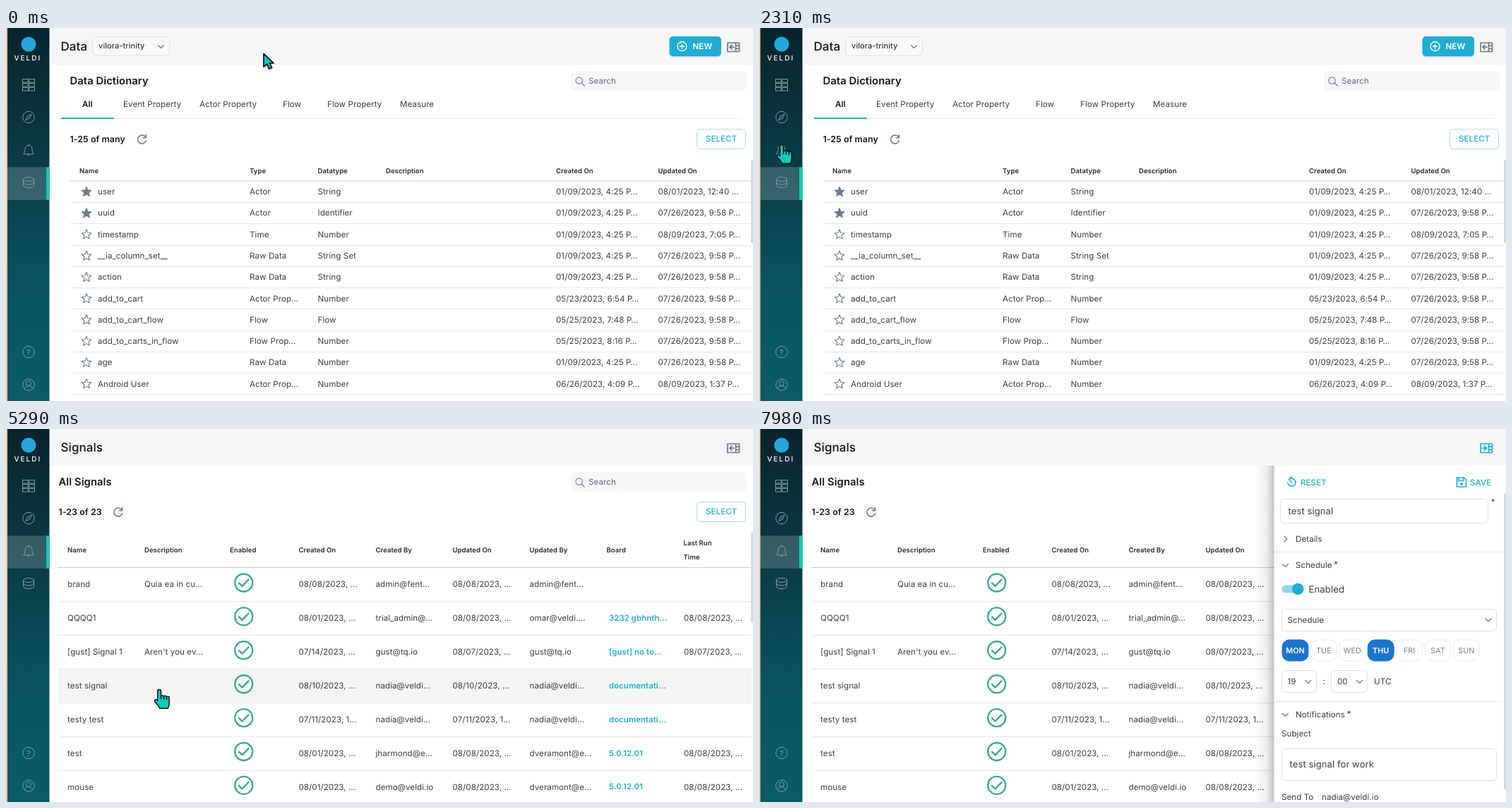
These frames come from a looping animation (1058 by 529 pixels, 8950 ms). An HTML page:

```html
<!DOCTYPE html>
<html lang="en">
<head>
<meta charset="utf-8">
<title>Signals demo</title>
<style>
html, body { margin: 0; width: 100%; height: 100%; overflow: hidden; background: #fff; }
svg { display: block; width: 100vw; height: 100vh; }
text { font-family: Inter, sans-serif; letter-spacing: .06px; white-space: pre; text-rendering: geometricPrecision; }
.line { stroke-linecap: round; stroke-linejoin: round; }
</style>
</head>
<body>
<svg id="stage" viewBox="0 0 1058 529">
  <defs>
    <linearGradient id="sea" x2="0" y2="1">
      <stop offset="0" stop-color="#06242d"/><stop offset=".2" stop-color="#08313b"/>
      <stop offset=".72" stop-color="#0a5563"/><stop offset="1" stop-color="#0a5a67"/>
    </linearGradient>
    <linearGradient id="shade">
      <stop offset="0" stop-opacity="0"/><stop offset=".6" stop-opacity=".07"/><stop offset="1" stop-opacity=".24"/>
    </linearGradient>
  </defs>
</svg>
<script>
const LOOP = 8950, CYAN = '#20aed2', GREY = '#6c7c8b', TEAL = '#10c8bd', INK = '#15181b', BODY = '#3a3f44';
const stage = document.getElementById('stage');

// Markup helpers
const text = (x, y, s, size = 11.6, weight = 400, fill = BODY, extra = '') =>
  `<text x="${x}" y="${y}" style="font-size:${size}px;font-weight:${weight};fill:${fill};${extra}">${s}</text>`;
const rect = (x, y, w, h, fill, r = 0, stroke = 'none') =>
  `<rect x="${x}" y="${y}" width="${w}" height="${h}" rx="${r}" fill="${fill}" stroke="${stroke}"/>`;
const path = (d, stroke, width = 1, fill = 'none') =>
  `<path class="line" d="${d}" stroke="${stroke}" stroke-width="${width}" fill="${fill}"/>`;
const ring = (x, y, r, stroke, width = 1, fill = 'none') =>
  `<circle cx="${x}" cy="${y}" r="${r}" fill="${fill}" stroke="${stroke}" stroke-width="${width}"/>`;
const hline = (x1, x2, y, fill = '#e3e5e7') => rect(x1, y, x2 - x1, 1, fill);
const group = (id, body) => `<g id="${id}">${body}</g>`;
const list = (n, f) => Array.from({ length: n }, (_, i) => f(i)).join('');
const chevron = (x, y, w = 4, c = '#6b747c') => path(`M${x - w} ${y - w / 2}l${w} ${w}l${w} ${-w}`, c, 1.1);
const refresh = (x, y) => path(`M${x + 5} ${y - 3.5}a6 6 0 1 0 .9 5M${x + 5.8} ${y - 6.5}v4.2h-4.2`, GREY, 1.6);

function star(x, y, full) {
  const pts = Array.from({ length: 10 }, (_, i) => {
    const r = i % 2 ? 3.2 : 7.3, a = (i / 5 - .5) * Math.PI;
    return `${(x + r * Math.cos(a)).toFixed(1)} ${(y + r * Math.sin(a)).toFixed(1)}`;
  });
  return path(`M${pts.join('L')}Z`, GREY, 1.1, full ? GREY : 'none');
}

// Box with a column of cells at its right and an arrow at its left
const panelIcon = (color, arrow) =>
  path('M1022 21H1038.5V33.5H1022ZM1033.5 21V33.5M1033.5 25.2h5M1033.5 29.3h5' + arrow, color, 1.7);

const searchBox = rect(800, 61, 249, 27.5, '#f5f6f8', 6) +
  ring(811.7, 74.5, 4.7, '#75828e', 1.2) + path('M815.2 78l4 4', '#75828e', 1.2) +
  text(825, 79, 'Search', 11.6, 400, '#626b73');
const selectButton = y => rect(978.5, y, 69, 28, '#fff', 5, '#a9dcea') + text(991, y + 17.8, 'SELECT', 11.6, 500, CYAN);

function sidebar() {
  const c = '#7f9ba3';
  return rect(0, 0, 61.5, 529, 'url(#sea)') + rect(0, 0, 2, 529, '#f3c892') +
    group('active', rect(2, 0, 55, 46.5, '#ffffff2e') + rect(57, 0, 4.5, 46.5, TEAL)) +
    ring(32, 23, 10.5, 'none', 0, '#1fa9dc') +
    text(11.5, 46, 'VELDI', 10, 500, '#fff', 'letter-spacing:2px') +
    list(6, i => rect(23.5 + i % 2 * 9.2, 72.5 + (i >> 1) * 6, 7.8, 4.5, 'none', 0, c)) +
    ring(32, 126.5, 8.2, c) + path('M36 122.5l-2.5 5.5l-5.5 2.5l2.5 -5.5ZM31 125.5l2 2', c) +
    path('M25 178.5q2 -2 2 -6q0 -6 5 -6t5 6q0 4 2 6ZM30.5 180.2h3M32 166v-1.3', c) +
    path('M24.5 214.5a7.5 3 0 0 1 15 0v9a7.5 3 0 0 1 -15 0ZM24.5 214.5a7.5 3 0 0 0 15 0M24.5 219a7.5 3 0 0 0 15 0', c) +
    ring(32, 459.5, 8.2, c) + text(29, 463.5, '?', 11, 400, c) +
    ring(32, 506, 8.2, c) + ring(32, 504, 3.4, c) + path('M26.5 511.5q1 -4 5.5 -4t5.5 4', c);
}

function dataPage() {
  const cols = [130, 345, 441.5, 779, 923.5];
  const jan = '01/09/2023, 4:25 P…', jul = '07/26/2023, 9:58 P…';
  const rows = [
    ['user', 'Actor', 'String', jan, '08/01/2023, 12:40 …'],
    ['uuid', 'Actor', 'Identifier', jan, jul],
    ['timestamp', 'Time', 'Number', jan, '08/09/2023, 7:05 P…'],
    ['__ia_column_set__', 'Raw Data', 'String Set', jan, jul],
    ['action', 'Raw Data', 'String', jan, jul],
    ['add_to_cart', 'Actor Prop…', 'Number', '05/23/2023, 6:54 P…', jul],
    ['add_to_cart_flow', 'Flow', 'Flow', '05/25/2023, 7:48 P…', jul],
    ['add_to_carts_in_flow', 'Flow Prop…', 'Number', '05/25/2023, 8:16 P…', jul],
    ['age', 'Raw Data', 'Number', jan, jul],
    ['Android User', 'Actor Prop…', 'Number', '06/26/2023, 4:09 P…', '08/09/2023, 1:37 P…']
  ];
  const heads = [[104, 'Name'], [345, 'Type'], [441.5, 'Datatype'], [538, 'Description'], [779, 'Created On'], [923.5, 'Updated On']];
  const tabs = [[166, 'Event Property'], [274, 'Actor Property'], [392, 'Flow'], [455, 'Flow Property'], [558, 'Measure']];
  return rect(61, 52, 997, 477, '#fff') + rect(61, 0, 997, 52.5, '#f5f6f8') +
    text(77.5, 32, 'Data', 17, 500, INK) + rect(122.5, 12.5, 109, 26.5, '#f8f9fa', 6, '#dde1e5') +
    text(131, 29.3, 'vilora-trinity', 11, 500) + chevron(219.5, 26.5) +
    rect(940, 14, 73, 28, '#d3dadd', 5) + rect(939.5, 12, 73.5, 28, CYAN, 5) +
    ring(957.5, 26, 6.5, '#fff', 1.3) + path('M954.3 26h6.4M957.5 22.8v6.4', '#fff', 1.3) +
    text(972.5, 30, 'NEW', 11.6, 600, '#fff') + panelIcon(GREY, 'M1025 27.2h6M1028 24.2l-3 3l3 3') +
    text(90.5, 80, 'Data Dictionary', 14.8, 600, INK) + searchBox +
    hline(78, 1043, 128, '#eceeef') + rect(78, 127, 75, 2, '#18bdb5') + text(108, 112.3, 'All', 11.6, 600, INK) +
    tabs.map(([x, s]) => text(x, 112.3, s)).join('') +
    text(90.5, 162.3, '1-25 of many', 12.4, 600, INK) + refresh(192.5, 158) + selectButton(143.5) +
    heads.map(([x, s]) => text(x, 205.5, s, 9.5, 600, '#25292c')).join('') + hline(91, 1056, 216.5, '#c9cdd0') +
    rows.map((row, i) => {
      const y = 232 + i * 30.27;
      return star(114, y + .5, i < 2) + row.map((s, k) => text(cols[k], y + 4.2, s)).join('') + hline(91, 1056, Math.round(y + 15));
    }).join('') + rect(1055, 187, 3, 118, '#d3dae4', 1.5);
}

function signalsPage() {
  const cols = [87, 196, 414.5, 523.5, 632.5, 741.5, 854, 960];
  const aug8 = '08/08/2023, …', aug1 = '08/01/2023, …', aug10 = '08/10/2023, …', nadia = 'nadia@veldi…';
  const rows = [
    ['brand', 'Quia ea in cu…', aug8, 'admin@fent…', aug8, 'admin@fent…', '', ''],
    ['QQQQ1', '', aug1, 'trial_admin@…', aug8, 'omar@veldi.…', '3232 gbhnth…', aug8],
    ['[gust] Signal 1', "Aren't you ev…", '07/14/2023, …', 'gust@tq.io', '08/07/2023, …', 'gust@tq.io', '[gust] no to…', '08/07/2023, …'],
    ['test signal', '', aug10, nadia, aug10, nadia, 'documentati…', ''],
    ['testy test', '', '07/11/2023, 1…', nadia, '07/11/2023, 1…', nadia, 'documentati…', ''],
    ['test', '', aug1, 'jharmond@e…', aug8, 'dveramont@e…', '5.0.12.01', aug8],
    ['mouse', '', aug1, 'demo@veldi.io', aug8, 'dveramont@e…', '5.0.12.01', aug8]
  ];
  const heads = [[87, 'Name'], [196, 'Description'], [317, 'Enabled'], [414.5, 'Created On'], [523.5, 'Created By'],
    [632.5, 'Updated On'], [741.5, 'Updated By'], [850.5, 'Board']];
  return rect(61, 52, 997, 477, '#fff') + rect(61, 0, 997, 52.5, '#f5f6f8') + text(77.5, 32, 'Signals', 17, 500, INK) +
    group('closedIcon', panelIcon(GREY, 'M1025 27.2h6M1028 24.2l-3 3l3 3')) +
    group('openIcon', panelIcon(CYAN, 'M1024.5 27.2h6M1027.5 24.2l3 3l-3 3')) +
    text(74.5, 80, 'All Signals', 14.8, 600, INK) + searchBox +
    text(74.5, 122.3, '1-23 of 23', 12.4, 600, INK) + refresh(158.8, 118) + selectButton(103.5) +
    heads.map(([x, s]) => text(x, 175, s, 9.5, 600, '#25292c')).join('') +
    text(959.5, 164.5, 'Last Run', 9.5, 600, '#25292c') + text(959.5, 184.5, 'Time', 9.5, 600, '#25292c') +
    `<rect id="hover" x="74" width="982" height="48" fill="#f4f4f4"/>` + hline(74, 1056, 196, '#c9cdd0') +
    rows.map((row, i) => {
      const y = 220 + i * 47.9;
      return row.map((s, k) => k === 6 ? text(cols[k], y + 4, s, 11.4, 600, CYAN) : text(cols[k], y + 4.2, s)).join('') +
        ring(336.7, y - 2, 12.5, '#3fa892', 2.4) + path(`M330 ${y - 1.6}l4.5 4.5l9 -9.2`, '#3fa892', 2.4) +
        hline(74, 1056, Math.round(y + 24));
    }).join('') + rect(1055, 147, 3, 128, '#d3dae4', 1.5);
}

function panel() {
  const days = ['MON', 'TUE', 'WED', 'THU', 'FRI', 'SAT', 'SUN'], edge = '#dcdfe2';
  return rect(702, 52, 28, 477, 'url(#shade)') + rect(729.5, 52, 329, 477, '#fff') +
    path('M750.5 71.5a5.6 5.6 0 1 1 -1.6 5M754.5 67.5l-4 4l4 4', CYAN, 1.6) + text(767, 79.5, 'RESET', 11.6, 500, CYAN) +
    path('M988.5 69h10l3 3v10h-13ZM991 69.8v3.7h6.5v-3.7', CYAN, 1.7) + ring(995, 78, 1.6, CYAN, 1, CYAN) +
    text(1007, 79.5, 'SAVE', 11.6, 500, CYAN) +
    rect(738.5, 99.5, 294, 34, '#fff', 5, edge) + text(749.5, 121.3, 'test signal', 13.1) + text(1037, 107, '*', 11) +
    path('M744 152l4 4l-4 4', '#6b747c', 1.1) + text(760, 160.3, 'Details') + hline(730, 1052, 174) +
    chevron(745.5, 193.5) + text(760, 197.3, 'Schedule') + text(814, 196, '*', 12) +
    rect(740.5, 221.5, 28, 11, '#90d7e9', 5.5) + ring(763.3, 227, 8.3, CYAN, 0, CYAN) + text(778.5, 231.5, 'Enabled', 13.2) +
    rect(740.5, 255.5, 304, 31, '#fff', 5, edge) + text(748.5, 275.2, 'Schedule') + chevron(1033, 271) +
    days.map((d, i) => {
      const on = i % 3 === 0 && i < 6, x = 741 + i * 40.4;
      return rect(x, 299, 37, 30, on ? '#1b75d0' : '#fff', 10, on ? '#1b75d0' : '#e6e8ea') +
        text(x + 18.5, 318, d, 10.8, on ? 600 : 400, on ? '#fff' : '#777d83', 'text-anchor:middle');
    }).join('') +
    rect(740.5, 342.5, 49, 31, '#fff', 5, edge) + text(748.5, 362.2, '19') + chevron(778, 358.5) + text(798.5, 362, ':', 12) +
    rect(810.5, 342.5, 51, 31, '#fff', 5, edge) + text(819, 362.2, '00') + chevron(850.5, 358.5) + text(871, 362.2, 'UTC') +
    hline(730, 1052, 386) + chevron(745.5, 405.5) + text(760, 409.3, 'Notifications') + text(832.5, 408, '*', 12) +
    text(740, 435.5, 'Subject') + rect(740.5, 453.5, 304, 45, '#fff', 5, edge) + text(751.5, 480, 'test signal for work', 13.1) +
    text(740, 526, 'Send To') + text(797, 526, 'nadia@veldi.io') + rect(1055, 91, 3, 420, '#d3dae4', 1.5);
}

const cursor = group('cursor',
  group('arrow', path('M1 1.5V20L5.5 16.2L8.8 23L12.6 21.2L9.5 14.8H15Z', '#101416', 1.8, TEAL)) +
  group('hand', path('M-2.3 3a2.4 2.4 0 0 1 4.8 0V10a2.2 2.2 0 0 1 4 .6a2.1 2.1 0 0 1 4 1a1.9 1.9 0 0 1 3.7 1V20' +
    'q0 4 -2 7.2H.5q-1 -3.5 -6 -8.4q-2.2 -3.4 .3 -4.2q1.7 -.3 2.9 2.2ZM2.5 10v3.5M6.5 11v3M10.5 12v2.5', '#101416', 1.5, TEAL)));

stage.innerHTML += group('data', dataPage()) + group('signals', signalsPage()) + group('panel', panel()) +
  sidebar() + group('ripple', ring(0, 0, 22, TEAL, 1.5)) + cursor;

const el = id => document.getElementById(id);
const show = (id, on) => el(id).setAttribute('display', on ? 'inline' : 'none');
const move = (id, x, y, scale = 1) => el(id).setAttribute('transform', `translate(${x} ${y}) scale(${scale})`);
const span = (t, a, b) => Math.min(1, Math.max(0, (t - a) / (b - a)));
const smooth = u => u * u * (3 - 2 * u);

// Pointer stops: time, x, y
const stops = [[0, 364, 35], [1240, 364, 35], [1790, 120, 145], [1890, 120, 145], [2090, 31, 157], [2190, 31, 157],
  [2310, 32, 165], [2610, 28, 162], [3110, 373, 67], [4910, 373, 67], [5290, 217, 369], [5500, 221, 372],
  [6000, 393, 54], [7300, 393, 54], [7980, 420, 532]];

function pointer(t) {
  const i = stops.findLastIndex(s => s[0] <= t), a = stops[i], b = stops[i + 1];
  // Between clips the pointer cuts to its next place.
  if (!b || a[0] === 2610 || a[0] === 5500) return [a[1], a[2]];
  const u = smooth(span(t, a[0], b[0]));
  return [a[1] + (b[1] - a[1]) * u, a[2] + (b[2] - a[2]) * u];
}

function draw(t) {
  const [x, y] = pointer(t), onSignals = t >= 2750;
  const seen = t < 2750 || t >= 3110 && t < 5710 || t >= 6000 && t < 7980;
  const row = onSignals && seen && y > 196 && y < 529 ? Math.floor((y - 196) / 47.9) : -1;
  const hand = row >= 0 || !onSignals && x < 61;

  show('signals', onSignals);
  el('signals').setAttribute('opacity', t < 2810 ? .5 : 1);
  move('active', 0, onSignals ? 151.3 : 197.3);
  show('hover', row >= 0);
  el('hover').setAttribute('y', 196 + row * 47.9);

  const slide = 1 - (1 - span(t, 5690, 5980)) ** 3, open = t >= 5710;
  show('panel', open);
  move('panel', 358 * (1 - slide), 0);
  show('openIcon', open);
  show('closedIcon', !open);

  show('cursor', seen);
  show('arrow', !hand);
  show('hand', hand);
  move('cursor', x, y);

  const click = t < 2610 ? span(t, 2330, 2610) : t < 5500 ? span(t, 5310, 5500) : 0;
  show('ripple', click > 0);
  move('ripple', x + 4, y + 13, click);
  el('ripple').setAttribute('opacity', .6 * (1 - click));
}

function tick() {
  draw(performance.now() % LOOP);
  requestAnimationFrame(tick);
}
tick();
</script>
</body>
</html>
```
